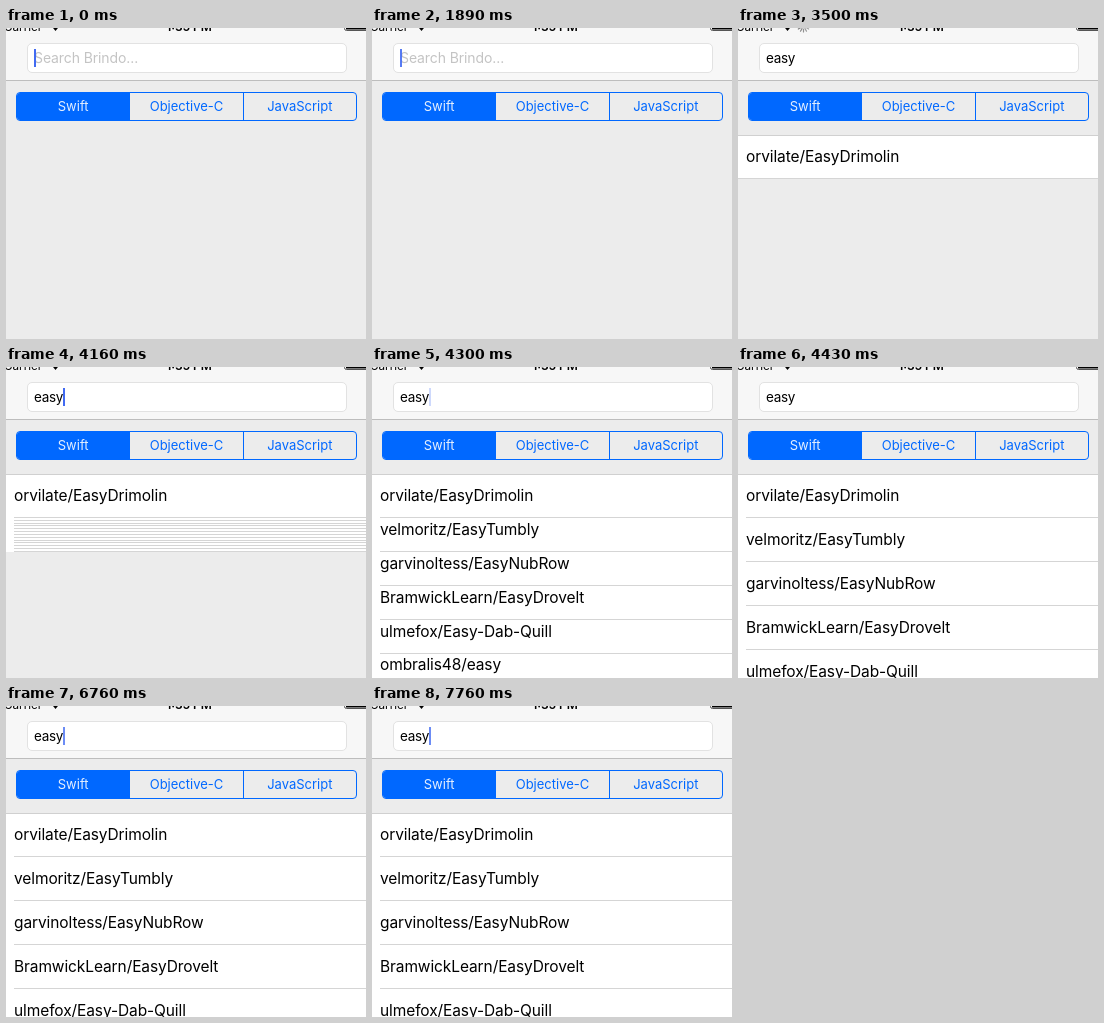
Recreate the animation shown at these times as an HTML page. Size 360x311 px, loop 7830 ms.

```html
<!DOCTYPE html>
<html lang="en">
<head>
<meta charset="utf-8">
<title>Repository search</title>
<style>
  html, body { margin: 0; width: 100%; height: 100%; overflow: hidden; }
  #stage {
    position: relative; width: 360px; height: 311px; overflow: hidden;
    background: #ececec; color: #000;
    font-family: Inter, Roboto, sans-serif; white-space: nowrap;
  }
  #stage div, #stage svg { position: absolute; box-sizing: border-box; }

  #bar { left: 0; top: 0; width: 360px; height: 53px; background: #f7f7f7; border-bottom: 1px solid #bdbdbd; }
  #status { left: 0; top: 0; }
  #field {
    left: 20.5px; top: 15px; width: 320.5px; height: 30px; padding-left: 6.5px;
    border: 1px solid #e2e2e2; border-radius: 5px; background: #fff;
    font-size: 14px; line-height: 28px; letter-spacing: -.1px;
  }
  #hint { left: 6.5px; top: 0; color: #c4c4c4; }
  #query { font-size: 13.5px; letter-spacing: -.3px; }
  #caret { display: inline-block; position: relative; width: 0; }
  #caret::after {
    content: ""; position: absolute; left: 0; top: -14px;
    width: 2px; height: 18px; background: #426bf2;
  }

  #tabs {
    left: 10px; top: 64px; width: 341px; height: 29px; display: flex; overflow: hidden;
    border: 1px solid #0068ff; border-radius: 4px;
    font-size: 13px; line-height: 27px; text-align: center; color: #0068ff;
  }
  #tabs span { flex: 1; }
  #tabs span + span { border-left: 1px solid #0068ff; }
  #tabs span:first-child { background: #0068ff; color: #e4efff; }

  #list { left: 0; top: 107px; width: 360px; height: 204px; overflow: hidden; }
  #rule { left: 0; top: 0; width: 360px; height: 1px; background: #d0d0d0; z-index: 99; }
  .row {
    left: 0; width: 360px; height: 44px; padding-left: 8px; background: #fff;
    font-size: 15.5px; line-height: 43px; letter-spacing: -.1px;
  }
  .row::after {
    content: ""; position: absolute; left: var(--inset, 8px); right: 0; bottom: 0;
    height: 1px; background: #d5d5d5;
  }
</style>
</head>
<body>
<div id="stage">
  <div id="bar"></div>
  <svg id="status" width="360" height="8" font-size="12">
    <text x="-2" y="3" font-size="11.700">Carrier</text>
    <path d="M43 -5 Q49.500 -10 56 -5 L49.500 3 Z"/>
    <g id="spinner" stroke="#777" stroke-width="1.200" stroke-linecap="round"></g>
    <text x="183" y="3" text-anchor="middle" font-weight="600">1:35 PM</text>
    <rect x="338.500" y="-7" width="24" height="9.500" rx="2" fill="none" stroke="#555"/>
    <rect x="340" y="-5" width="20" height="6.500"/>
  </svg>
  <div id="field"><div id="hint">Search Brindo...</div><span id="query"></span><span id="caret"></span></div>
  <div id="tabs"><span>Swift</span><span>Objective-C</span><span>JavaScript</span></div>
  <div id="list"><div id="rule"></div></div>
</div>
<script>
const LOOP = 7830, TICK = 1000 / 15, ROW = 44, ROW_COUNT = 13;
const names = [
  'orvilate/EasyDrimolin', 'velmoritz/EasyTumbly', 'garvinoltess/EasyNubRow',
  'BramwickLearn/EasyDrovelt', 'ulmefox/Easy-Dab-Quill', 'ombralis48/easy'
];
const typing = [[0, ''], [1960, 'e'], [2100, 'ea'], [2230, 'eas'], [2430, 'easy']];
const $ = id => document.getElementById(id);
const clamp = x => Math.min(1, Math.max(0, x));
const ramp = (x, from, to) => clamp((x - from) / (to - from));

const rows = Array.from({ length: ROW_COUNT }, (_, i) => {
  const row = document.createElement('div');
  row.className = 'row';
  row.textContent = names[i] || '';
  row.style.zIndex = ROW_COUNT - i;
  return $('list').appendChild(row);
});

const spokes = Array.from({ length: 12 }, (_, i) => {
  const line = document.createElementNS('http://www.w3.org/2000/svg', 'path');
  line.setAttribute('d', 'M65.500 1V4');
  line.setAttribute('transform', `rotate(${i * 30} 65.500 -2)`);
  return $('spinner').appendChild(line);
});

// Cubic ease-in-out with control points (.42, 0) and (.58, 1)
function easeInOut(x) {
  let lo = 0, hi = 1;
  for (let i = 0; i < 20; i++) {
    const s = (lo + hi) / 2, r = 1 - s;
    if (1.26 * r * r * s + 1.74 * r * s * s + s ** 3 < x) lo = s; else hi = s;
  }
  return lo * lo * (3 - 2 * lo);
}

function caretOpacity(t) {
  if (t >= 1950 && t < 3100) return 1;
  const phase = t % 1000;
  return t < 1950
    ? 1 - ramp(phase, 300, 620) + ramp(phase, 800, 900)
    : 1 - ramp(phase, 170, 330) + ramp(phase, 600, 800);
}

function render(t) {
  const tick = Math.floor((t - 22) / TICK);
  const step = Math.max(0, 22 + tick * TICK);

  const text = typing.filter(([at]) => t >= at).pop()[1];
  $('query').textContent = text;
  $('hint').style.visibility = text ? 'hidden' : 'visible';
  $('caret').style.opacity = caretOpacity(step);

  $('spinner').style.display = t >= 2700 && t < 3900 ? '' : 'none';
  const head = t < 3230 ? 0 : tick;
  spokes.forEach((line, i) => line.style.opacity = .25 + .75 * ((i - head % 12 + 12) % 12) / 11);

  $('list').style.display = t < 2030 ? 'none' : '';
  const spread = easeInOut(ramp(step, 4107, 4379));
  rows.forEach((row, i) => {
    row.style.top = i * ROW * spread + 'px';
    row.style.display = i && t < 4160 ? 'none' : '';
  });
  rows[0].style.setProperty('--inset', t < 4030 ? '0px' : '8px');
}

const start = performance.now();
function frame() {
  render((performance.now() - start) % LOOP);
  requestAnimationFrame(frame);
}
frame();
</script>
</body>
</html>
```
